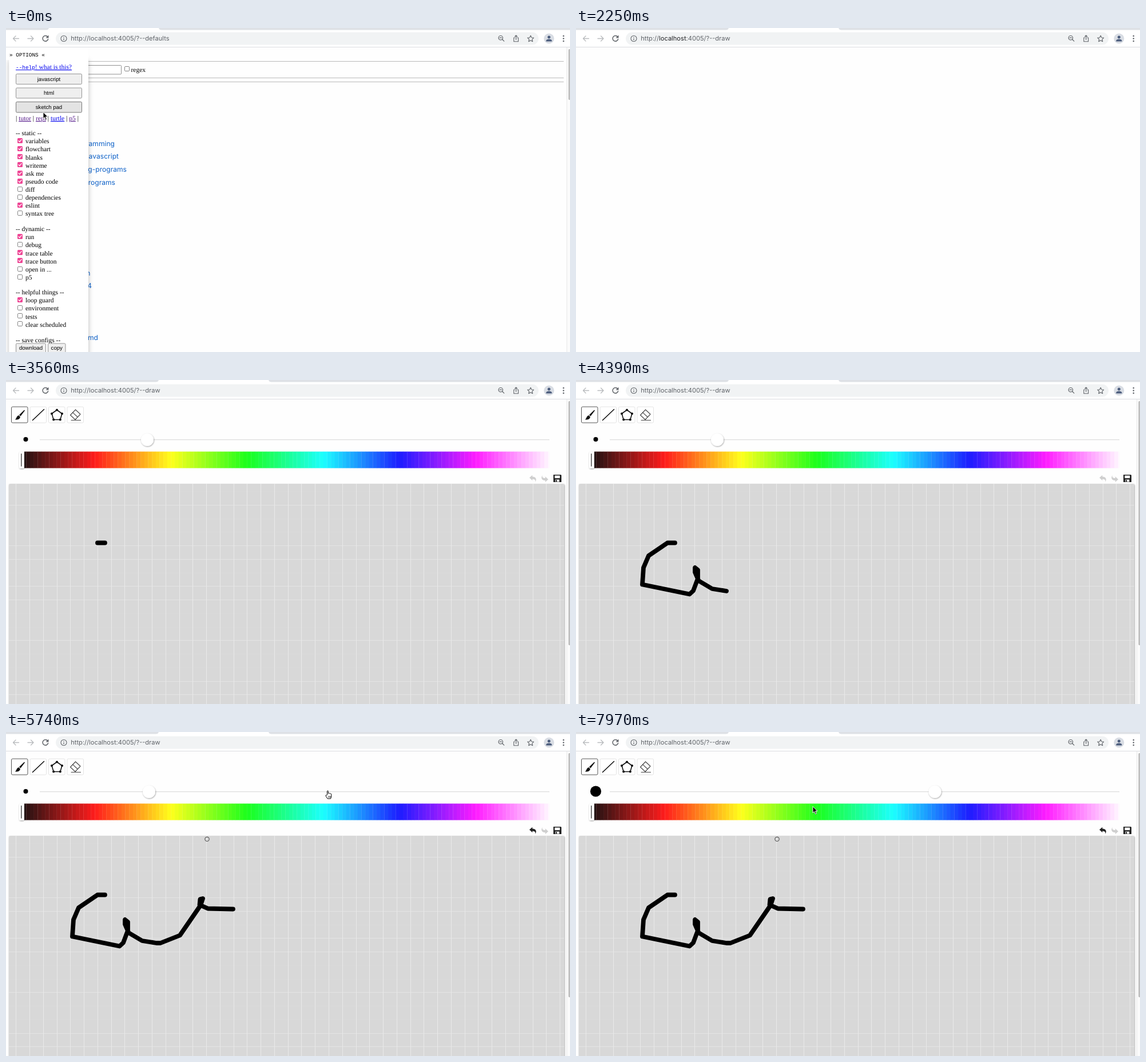
Write an HTML page that moves like this. It is 986 by 568 pixels and loops after 8 s.

```html
<!DOCTYPE html>
<html lang="en">
<head>
<meta charset="utf-8">
<title>Sketch pad</title>
<style>
html, body { margin: 0; width: 100%; height: 100%; overflow: hidden; background: #fff; }
svg { display: block; width: 986px; height: 568px; }
text { white-space: pre; text-rendering: geometricPrecision; }
.ui { font: 11.1px Inter, sans-serif; }
.link { font: 12.1px Inter, sans-serif; fill: #0f62c8; text-anchor: end; }
.serif { font: 11.5px "Liberation Serif", serif; }
.mono { font: 9.4px "Liberation Mono", monospace; }
.btn { font: 9.6px "Liberation Sans", sans-serif; text-anchor: middle; }
.a { fill: #0000ee; text-decoration: underline; }
.v { fill: #551a8b; text-decoration: underline; }
.line { fill: none; stroke-linecap: round; stroke-linejoin: round; }
</style>
</head>
<body>
<svg id="stage" viewBox="0 0 986 568" xmlns="http://www.w3.org/2000/svg"></svg>
<script>
const LOOP = 8000;
const $ = id => document.getElementById(id);

// Markup helpers
const rect = (x, y, w, h, fill, more = '') => `<rect x="${x}" y="${y}" width="${w}" height="${h}" fill="${fill}" ${more}/>`;
const line = (d, stroke, width = 1, more = '') => `<path class="line" d="${d}" stroke="${stroke}" stroke-width="${width}" ${more}/>`;
const text = (x, y, cls, s, more = '') => `<text x="${x}" y="${y}" class="${cls}" ${more}>${s}</text>`;
const dot = (x, y, r, fill, more = '') => `<circle cx="${x}" cy="${y}" r="${r}" fill="${fill}" ${more}/>`;
const group = (id, body, more = '') => `<g id="${id}" ${more}>${body}</g>`;

const button = (x, y, w, h, label, id = '') =>
  rect(x + .5, y + .5, w - 1, h - 1, '#efefef', `rx="1.8" stroke="#8a8a8a" stroke-width=".9" id="${id}"`) +
  text(x + w / 2, y + h / 2 + 3.3, 'btn', label);

const checkbox = (x, y, on) => on
  ? rect(x, y, 9, 9, '#ee4695', 'rx="1.6"') + line(`M${x + 2} ${y + 4.7}l1.8 1.9l3.4 -4.2`, '#fff', 1.3)
  : rect(x + .5, y + .5, 8, 8, '#fff', 'rx="1.3" stroke="#767676" stroke-width=".9"');

function browser() {
  const grey = '#5f6368', pale = '#b9bbbe';
  return rect(0, 0, 986, 33, '#fff') +
    `<path id="tabs" fill="#dee1e6"/>` +
    rect(0, 33, 986, 1, '#dadce0') +
    rect(87, 7.5, 844, 22, '#f1f3f4', 'rx="11"') +
    line('M22.5 18.5H12.5M17 14l-4.5 4.5l4.5 4.5', pale, 1.3) +
    line('M38 18.5h10M43.500 14l4.500 4.500l-4.500 4.500', pale, 1.3) +
    group('reload', line('M72.800 15.500A4.800 4.800 0 1 0 73.600 19.500', grey, 1.5) + `<path d="M74.500 12.500v5h-5z" fill="${grey}"/>`) +
    group('stop', line('M64.500 14l9 9m0 -9l-9 9', grey, 1.5)) +
    dot(101, 18.5, 5, 'none', `stroke="${grey}" stroke-width="1.1"`) +
    line('M101 18.200v3', grey, 1.2, 'style="stroke-linecap:butt"') + dot(101, 16.2, .75, grey) +
    `<text class="ui" x="113.300" y="22.300" fill="#5f6368"><tspan id="scheme"></tspan><tspan id="host"></tspan><tspan id="path"></tspan></text>` +
    group('zoom', dot(864.8, 17.2, 3.7, 'none', `stroke="${grey}" stroke-width="1.200"`) +
      line('M867.600 20l3.200 3.200M863.200 17.200h3.200', grey, 1.2)) +
    line('M889.500 17h-1.700v6.800h7.800v-6.800h-1.700M891.700 20.500v-7.500M889.600 15l2.100 -2.100l2.100 2.100', grey, 1.1) +
    line('M917.200 13.200l1.600 3.600l3.900 .4l-2.900 2.600l.9 3.900l-3.500 -2l-3.500 2l.9 -3.900l-2.900 -2.600l3.900 -.4z', grey, 1.1) +
    dot(949.3, 18.5, 9, '#d9dde4') + dot(949.3, 16, 2.5, '#4c5d7d') +
    `<path d="M944.300 23.500v-1.200c0 -3.800 10 -3.800 10 0v1.200z" fill="#4c5d7d"/>` +
    [14, 18.5, 23].map(y => dot(974.7, y, 1.3, grey)).join('');
}

const scrollbar = bottom =>
  rect(980, 34, 6, 534, '#fbfbfb') + rect(980, 34, 1, 534, '#e8e8e8') +
  rect(983.3, 37, 4, bottom - 37, '#bebebe', 'rx="1.8"');

const sections = [
  [184, 'static', '+variables,+flowchart,+blanks,+writeme,+ask me,+pseudo code,diff,dependencies,+eslint,syntax tree'],
  [352, 'dynamic', '+run,debug,+trace table,+trace button,open in ...,p5'],
  [463, 'helpful things', '+loop guard,environment,tests,clear scheduled'],
  [546.5, 'save configs', '']
];

function optionsPage() {
  const rows = sections.map(([y, title, items]) =>
    text(17, y + 4, 'serif', `-- ${title} --`) +
    items.split(',').filter(Boolean).map((item, i) => {
      const cy = y + 14.1 * (i + 1), on = item[0] === '+';
      return checkbox(20, Math.round(cy - 5), on) + text(34, cy + 4.2, 'serif', on ? item.slice(1) : item);
    }).join('')).join('');
  const links = [
    [190, 206.5, 'programming'], [197, 229.3, 'javascript'], [211, 252, 'debugging-programs'],
    [191, 274.7, 'programs'], [147.5, 433.5, 'introduction'], [150, 455.5, 'chapter-4'], [161, 546.5, 'readme.md']
  ];
  const panel = rect(5.5, 56, 138.5, 530, '#fff', 'filter="url(#soft)"') +
    rect(0, 34, 144, 22, '#fff') +
    `<text class="serif a" x="17" y="72"><tspan class="mono">--help</tspan>! what is this?</text>` +
    button(17, 80, 116, 19, 'javascript') + button(17, 104.5, 116, 19, 'html') +
    button(17, 129, 116, 19.5, 'sketch pad', 'pad') +
    `<text class="serif" x="17" y="162">| <tspan class="v">tutor</tspan> | <tspan class="v">repl</tspan> | <tspan class="a">turtle</tspan> | <tspan class="v">p5</tspan> |</text>` +
    rows + button(17, 552.5, 53, 17, 'download') + button(73, 552.5, 31.5, 17, 'copy');
  return [58, 87, 94].map(y => rect(6, y, 969, 1, '#b9b9b9')).join('') +
    rect(20.5, 65.5, 181, 15.5, '#fff', 'rx="1" stroke="#858585" stroke-width=".9"') +
    checkbox(207, 67, false) + text(218.5, 77, 'serif', 'regex') +
    links.map(([x, y, s]) => text(x, y, 'link', s)).join('') +
    panel + text(6, 50, 'mono', '» OPTIONS «', 'font-weight="bold"') + scrollbar(126);
}

function spectrum() {
  const stops = [[0, 0, 0], [255, 0, 0], [255, 255, 0], [0, 255, 0], [0, 255, 255], [0, 0, 255], [255, 0, 255], [255, 255, 255]];
  const span = 133.2, band = span / 20;
  let out = '';
  for (let i = 0; i < 140; i++) {
    const x = 22 + i * band, p = (i + .5) / 20, k = Math.floor(p);
    const rgb = stops[k].map((c, j) => Math.round(28 + (c + (stops[k + 1][j] - c) * (p - k)) * 227 / 255 - (k ? 0 : 10 * (1 - p))));
    const left = Math.max(x, 32), right = Math.min(x + band, 950);
    if (right > left) out += rect(left.toFixed(2), 125.5, (right - left + .3).toFixed(2), 29, `rgb(${rgb})`);
  }
  return out;
}

function grid() {
  const bright = [1, 4, 5, 7, 8, 11, 14, 15];
  let out = '';
  for (let k = 0; k < 16; k++) {
    out += rect(5, Math.round(195.1 + k * 23.75), 971, 1, bright.includes(k) ? '#e4e4e4' : '#dadada');
  }
  for (let k = 0; k < 41; k++) out += rect(Math.round(17.3 + k * 23.77), 182, 1, 386, '#e9e9e9');
  return out;
}

function drawPage() {
  const tools = [9, 41.5, 74, 106.5].map((x, i) =>
    rect(x + .5, 47, 28.5, 28, '#fff', `rx="2" stroke="${i ? '#e4e4e4' : '#555'}"`)).join('');
  const corners = [[89, 52.5], [98, 59], [94.8, 69.5], [83.2, 69.5], [80, 59]];
  const icons =
    `<path d="M32 52.500l1 1l-7.500 10l-2.500 -2.300z" fill="#111"/>` +
    `<path d="M22.300 62l2.600 2.500c-.5 4.500 -4.500 5.500 -9.400 5c3 -1 2.400 -6.500 6.800 -7.500z" fill="#111"/>` +
    line('M46.500 70.500L66.500 51.500', '#111', 1.6) +
    line('M' + corners.join('L') + 'z', '#111', 1.6) + corners.map(c => dot(...c, 2.1, '#111')).join('') +
    line('M121.500 52l8.500 8l-9 9.500l-8.500 -8zM116.500 56.800l8.700 8.200M114 70.500h16.500', '#444', 1.1);
  const undo = 'M915 171.300l5.300 -4.600v2.800c5.500 0 8.400 4 5 9.200c.7 -4 -1.500 -5 -5 -5v2.600z';
  const disk = `<path d="M957 166h13l1 1v12h-14z" fill="#222"/>` +
    rect(959.3, 167.5, 9, 4.6, '#fff') + rect(960.3, 174.5, 7, 4, '#fff') + rect(961.2, 175.2, 2, 3.3, '#222');
  return tools + icons + `<circle id="size" cx="34.500" cy="104" fill="#000"/>` +
    rect(59, 104, 891, 1.3, '#dedede') +
    `<circle id="thumb" cy="104.800" r="11" fill="#fff" filter="url(#drop)"/>` +
    spectrum() + rect(23, 125.5, 8.5, 29.5, '#fff', 'rx="2.500" filter="url(#drop)"') + rect(26.2, 129, 1.3, 22.5, '#333') +
    `<path id="undo" d="${undo}"/>` + `<path d="${undo}" fill="#cfcfcf" transform="rotate(180 931.500 172.800)"/>` + disk +
    rect(5, 182, 971, 400, '#d8d8d8', 'rx="2" filter="url(#drop)"') + grid() +
    line('', '#000', 7.8, 'id="ink"') +
    `<circle id="ring" r="3.700" fill="none" stroke="#555" stroke-width="1.100"/>` + scrollbar(465);
}

const pointers =
  group('arrow', `<path d="M0 0v11.300l2.600 -2.400l1.900 4.300l1.900 -.8l-1.900 -4.200h3.600z" fill="#000" stroke="#fff" stroke-width=".9" stroke-linejoin="round"/>`, 'filter="url(#faint)"') +
  group('hand', `<path d="M-2.500 6.500V.6c0 -1.500 1.900 -1.500 1.900 0V4.200c.6 -.8 1.700 -.6 1.900 .2c.6 -.6 1.600 -.4 1.800 .4c.7 -.5 1.700 -.1 1.700 .9v3.700l-1.200 4h-5.500l-3.100 -4.800c-.7 -1.300 .8 -2 1.500 -1z" fill="#fff" stroke="#000" stroke-width="1"/>` +
    line('M-.2 9v2.500M1.600 9v2.500M3.300 9v2.500', '#000', .7));

const shadow = (id, dx, dy, blur, alpha) =>
  `<filter id="${id}" x="-30%" y="-30%" width="160%" height="160%"><feDropShadow dx="${dx}" dy="${dy}" stdDeviation="${blur}" flood-opacity="${alpha}"/></filter>`;

$('stage').innerHTML =
  `<defs>${shadow('soft', 0, 1, 4, .28)}${shadow('drop', .6, 1, 1.3, .4)}${shadow('faint', 0, .8, .7, .3)}</defs>` +
  rect(0, 0, 986, 568, '#fefefe') + group('options', optionsPage()) + group('draw', drawPage()) + browser() + pointers;

// Timelines: each entry holds from its time until the next one
const at = (track, t) => track.filter(k => k[0] <= t).pop();

const pad = [[0, '#e3e3e3', '#6a6a6a'], [300, '#f4f4f4', '#929292'], [440, '#e3e3e3', '#6a6a6a']];
const stroke = [
  [173, 285.5], [160, 285.5], [127, 308], [118, 329], [116, 358.5], [198.5, 375.5], [205, 369.5],
  [213, 348], [213, 333], [208, 329], [208, 337], [214.5, 352], [238, 366], [263, 370], [270, 370],
  [304, 356.5], [340, 304], [344, 292], [339.5, 293], [338.5, 303], [353, 309.5], [397, 310.5]
];
const inked = [[0, 0], [3560, 2], [3710, 4], [3860, 5], [4040, 7], [4220, 10], [4390, 14], [4590, 18], [4830, 22]];
const ring = [[0], [3140, 178.5, 320.5], [3560], [4980, 390, 270], [5140, 351.5, 187.8]];
const slider = [[0, 247, 4], [5450, 250, 4], [5890, 564, 8.2], [6040, 627.5, 9.6]];
const cursor = [
  [0, 'arrow', 65, 147.5], [1320, 'arrow', 100, 158], [1500, 'arrow', 160, 180], [1650, 'arrow', 196, 195], [2100],
  [5300, 'hand', 262, 104], [5450, 'hand', 253, 104], [5740, 'hand', 564, 103.5], [5890, 'hand', 610, 103.5],
  [6040, 'hand', 629, 103.5], [6340, 'hand', 632, 106], [6490, 'arrow', 638, 122], [6640, 'arrow', 644, 134],
  [6790, 'arrow', 646, 140], [7080, 'arrow', 628, 153], [7230, 'arrow', 598, 159], [7380, 'arrow', 579, 142],
  [7820, 'arrow', 500, 137], [7970, 'arrow', 414, 130.5]
];
const address = [
  [0, 'http://', 'localhost', ':4005/?--defaults', '#5f6368'],
  [870, 'about:', 'blank', '', '#202124'],
  [2100, 'http://', 'localhost', ':4005/?--draw', '#202124'],
  [2400, 'http://', 'localhost', ':4005/?--draw', '#5f6368']
];

const set = (id, attrs) => { for (const k in attrs) $(id).setAttribute(k, attrs[k]); };
const show = (id, on) => set(id, { visibility: on ? 'visible' : 'hidden' });

function render(t) {
  const first = t < 870, blank = t >= 870 && t < 2100;
  show('options', first);
  $('draw').style.display = t >= 2400 ? '' : 'none';
  show('reload', !blank);
  show('stop', blank);
  show('zoom', !blank);

  const left = first ? 75 : 267, right = left + 192;
  set('tabs', { d: `M0 0H${left}q-1 3.500 -5 3.500H0zM${right} 0H986V3.500H${right + 5}q-4 0 -5 -3.500z` });

  const [, scheme, host, path, shade] = at(address, t);
  $('scheme').textContent = scheme;
  $('host').textContent = host;
  $('path').textContent = path;
  set('host', { fill: shade });

  const [, fill, edge] = at(pad, t);
  set('pad', { fill, stroke: edge });

  const count = at(inked, t)[1];
  set('ink', { d: count ? 'M' + stroke.slice(0, count).join('L') : '' });
  set('undo', { fill: t >= 4980 ? '#222' : '#cfcfcf' });

  const [, rx, ry] = at(ring, t);
  $('ring').style.display = rx ? '' : 'none';
  if (rx) set('ring', { cx: rx, cy: ry });

  const [, thumb, size] = at(slider, t);
  set('thumb', { cx: thumb });
  set('size', { r: size });

  const [, kind, x, y] = at(cursor, t);
  for (const id of ['arrow', 'hand']) {
    show(id, id === kind);
    if (id === kind) set(id, { transform: `translate(${x} ${y})` });
  }
}

const start = performance.now();
function tick() {
  render((performance.now() - start) % LOOP);
  requestAnimationFrame(tick);
}
tick();
</script>
</body>
</html>
```
